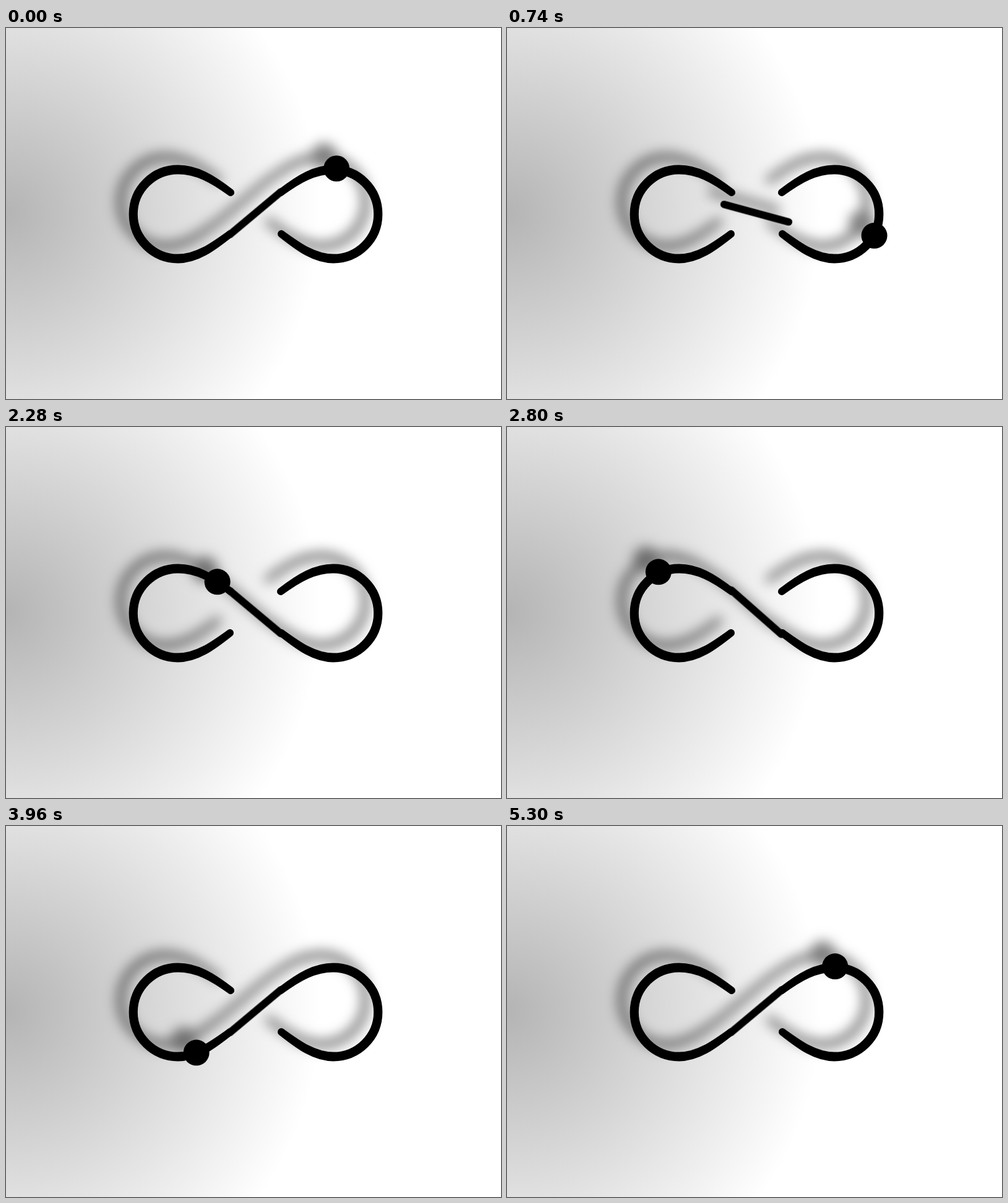
Write an HTML page that moves like this. It is 800 by 600 pixels and loops after 5.32 s.

```html
<!DOCTYPE html>
<html lang="en">
<head>
<meta charset="utf-8">
<title>Infinity loop</title>
<style>
  html, body { margin: 0; width: 100%; height: 100%; overflow: hidden; }
  body { background: radial-gradient(circle at 0 300px, #b4b4b4, #fff 508px); }
  svg { display: block; width: 800px; height: 600px; }

  .lines { fill: none; stroke: #000; stroke-width: 12; stroke-linecap: round; stroke-linejoin: round; }

  .bar {
    transform-box: view-box;
    transform-origin: 403px 299.5px;
    animation: turn 5320ms infinite;
  }
  .ball {
    offset-path: path("M528 227 C569 227 603 260 603 300 C603 341 569 374 528 374 C499 374 475 356 444 333 L363 266 C333 243 308 226.5 278 226.5 C237 226.5 204 260 204 300 C204 341 234 375 270 375 C298 375 331 358 362 333 L444 266 C474 243 499 227 528 227 Z");
    offset-rotate: 0deg;
    animation: travel 5320ms linear -30ms infinite;
  }

  @keyframes travel {
    from { offset-distance: 0%; }
    to { offset-distance: 100%; }
  }
  /* The bar swings into line with the ball before each crossing. */
  @keyframes turn {
    0% { transform: rotate(-40deg); animation-timing-function: cubic-bezier(.6, 0, .5, 1); }
    22.27% { transform: rotate(40deg); }
    50% { transform: rotate(40deg); animation-timing-function: cubic-bezier(.6, 0, .5, 1); }
    72.27%, 100% { transform: rotate(140deg); }
  }
</style>
</head>
<body>
<svg viewBox="0 0 800 600">
  <defs>
    <filter id="shadow" filterUnits="userSpaceOnUse" x="0" y="0" width="800" height="600">
      <feDropShadow dx="-20" dy="-20" stdDeviation="10" flood-color="#000" flood-opacity=".5"/>
    </filter>
    <!-- Out and back along two close curves, so the line swells away from its ends. -->
    <path id="loop" d="M363 266 C333 243 308 227.6 278 227.6 C237.5 227.6 204.6 260 204.6 301 S237.5 374.4 278 374.4 C308 374.4 333 356 362 333
      C333 354 308 371.6 278 371.6 C239 371.6 206.8 340 206.8 301 S239 230.4 278 230.4 C308 230.4 333 244 363 266 Z"/>
  </defs>
  <g filter="url(#shadow)">
    <g class="lines">
      <use href="#loop"/>
      <use href="#loop" transform="matrix(-1 0 0 1 807 0)"/>
      <path class="bar" d="M349 299.5 H457"/>
    </g>
    <circle class="ball" r="21"/>
  </g>
</svg>
</body>
</html>
```
